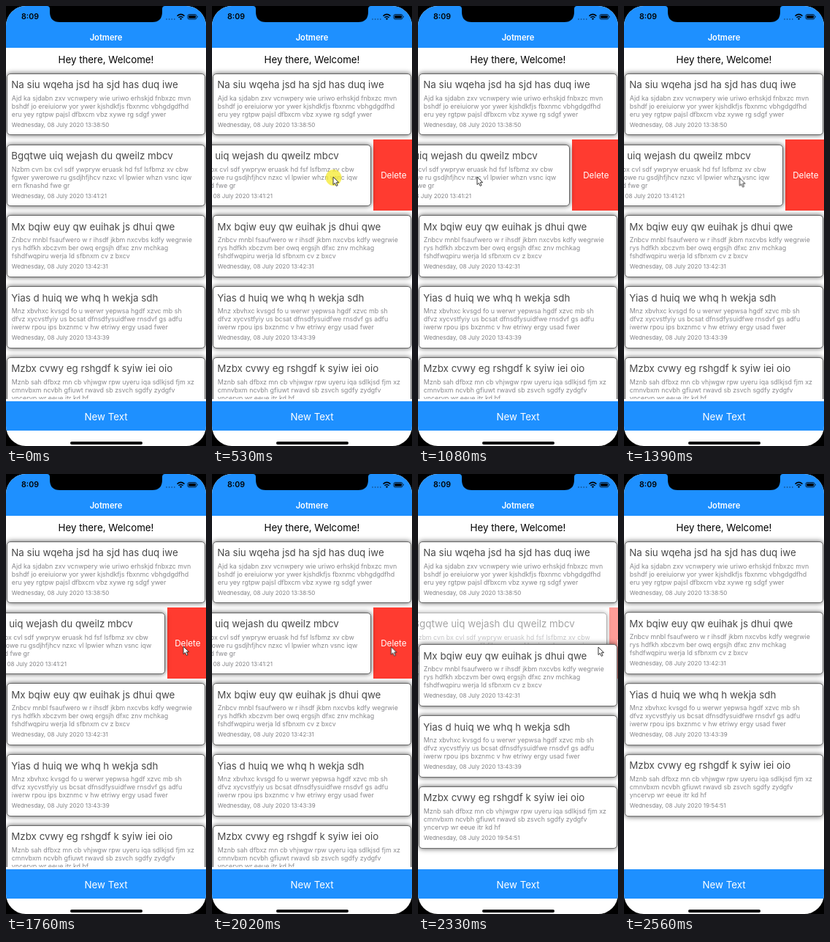
Recreate the animation shown at these times as an HTML page. Size 274 by 600 pixels, loop 2.87 s.

```html
<!DOCTYPE html>
<html lang="en">
<head>
<meta charset="utf-8">
<title>Notes list</title>
<style>
@property --swipe { syntax: "<length>"; inherits: true; initial-value: 0px; }
@property --fold { syntax: "<length>"; inherits: true; initial-value: 0px; }

:root { --now: 0; --blue: #1e90ff; }
html, body { margin: 0; width: 100%; height: 100%; overflow: hidden; background: #000; }
body { font-family: Inter, "Liberation Sans", sans-serif; }
.screen {
  position: absolute; left: 0; top: 0; width: 274px; height: 600px;
  overflow: hidden; border-radius: 27px; background: #fff;
}
.screen > * { position: absolute; }
.center { left: 0; width: 274px; text-align: center; white-space: nowrap; }
.header { top: 0; height: 57px; background: var(--blue); }
.name { top: 34px; line-height: 18px; font-size: 11.2px; font-weight: 600; color: #fff; }
.clock { left: 21px; top: 7px; line-height: 16px; font-size: 10.6px; font-weight: 600; }
.welcome { top: 64px; line-height: 18px; font-size: 13.3px; color: #000; }
.footer { top: 539px; height: 40px; line-height: 42px; font-size: 13.3px; color: #fff; background: var(--blue); }
.home { left: 88px; top: 594px; width: 99px; height: 3.5px; border-radius: 2px; background: #000; }
.overlay { left: 0; top: 0; }

.list { left: 0; top: 84px; width: 274px; height: 452px; overflow: hidden; }
.row { position: absolute; left: 0; width: 274px; height: 97px; }
.card {
  position: absolute; left: 1.3px; top: 7.2px; width: 272px; height: 84.5px;
  box-sizing: border-box; padding: 5.4px 0 0 5.5px;
  border: 1.4px solid #666; border-radius: 5px;
  background: #fff; box-shadow: 0 0 7px rgba(0, 0, 0, .65); white-space: pre;
}
.title { margin-left: -.5px; line-height: 18px; font-size: 13.35px; color: #4a4a4a; }
.text { margin-top: 3.6px; line-height: 11px; font-size: 8.9px; color: #88888c; }
.date { margin-top: 4px; line-height: 11px; font-size: 8px; color: #808084; }

.list, .row.open, .pointer, .press {
  animation: 2870ms linear infinite paused;
  animation-delay: calc(var(--now) * -1ms);
}
.list { animation-name: swipe, fold; }
.row.open { animation-name: fade; }
.open .card { transform: translateX(calc(-1 * var(--swipe))); }
.open ~ .row { transform: translateY(calc(-1 * var(--fold))); }
.delete {
  position: absolute; top: .5px; left: calc(276.4px - var(--swipe));
  width: max(55px, var(--swipe)); height: 97px; line-height: 98.4px;
  text-align: center; font-size: 11.7px; color: #fff; background: #ff3b30;
}
.pointer { left: 0; top: 0; width: 0; height: 0; animation-name: travel, show; }
.pointer svg { position: absolute; left: -20px; top: -19.5px; }
.press { animation-name: press; }

@keyframes swipe {
  0%, 6.97% { --swipe: 0px; }
  18.47% { --swipe: 55px; }
  26.83%, 29.62% { --swipe: 92px; }
  32.4% { --swipe: 84px; }
  34.84% { --swipe: 74px; }
  37.63% { --swipe: 65px; }
  40.77% { --swipe: 60px; }
  45.99%, 69.69% { --swipe: 55px; }
  72.47% { --swipe: 52px; }
  75.26% { --swipe: 45px; }
  81.18% { --swipe: 14px; }
  86.06%, 100% { --swipe: 0px; }
}
@keyframes fold {
  0%, 72.47% { --fold: 0px; }
  75.26% { --fold: 4.8px; }
  81.18% { --fold: 53px; }
  86.06% { --fold: 94px; }
  89.19%, 100% { --fold: 96.8px; }
}
@keyframes fade {
  0%, 75.3% { opacity: 1; }
  81.18% { opacity: .5; }
  86.06%, 100% { opacity: 0; }
}
@keyframes travel {
  0%, 2.79% { transform: translate(226px, 236px); }
  6.97% { transform: translate(224px, 235px); }
  18.47% { transform: translate(166px, 232px); }
  26.83% { transform: translate(84.5px, 225px); }
  29.62% { transform: translate(81px, 227px); }
  37.63% { transform: translate(81px, 232px); }
  40.77% { transform: translate(83px, 233px); animation-timing-function: ease-in-out; }
  56.45% { transform: translate(240px, 234px); }
  61.32% { transform: translate(243px, 234px); }
  75.26%, 100% { transform: translate(247px, 235px); }
}
@keyframes show {
  0% { opacity: 0; animation-timing-function: step-end; }
  2.7% { opacity: 1; animation-timing-function: step-end; }
  89.1%, 100% { opacity: 0; }
}
@keyframes press {
  0% { opacity: 0; animation-timing-function: step-end; }
  5% { opacity: .75; animation-timing-function: step-end; }
  29.5% { opacity: 0; animation-timing-function: step-end; }
  64.4% { opacity: .75; animation-timing-function: step-end; }
  69.6%, 100% { opacity: 0; }
}
</style>
</head>
<body>
<div class="screen">
  <div class="center header"></div>
  <div class="clock">8:09</div>
  <div class="center name">Jotmere</div>
  <div class="center welcome">Hey there, Welcome!</div>
  <div class="list" id="list"></div>
  <div class="center footer">New Text</div>
  <div class="home"></div>
  <svg class="overlay" width="274" height="30">
    <path d="M56 0q4 0 4 4v4q0 14 14 14h126q14 0 14-14v-4q0-4 4-4z"/>
    <path d="M220 18h12" stroke="#123a66" stroke-width="1.6" stroke-linecap="round" stroke-dasharray="0 3.6"/>
    <g fill="none" stroke="#000" stroke-width="1.5">
      <path d="M234.5 13.6q5-4.4 10 0M236.4 15.8q3.1-2.7 6.2 0"/>
      <rect x="249" y="11.5" width="12" height="6.5" rx="2" stroke-width=".8"/>
    </g>
    <path d="M237.8 17.2q1.7-1.3 3.4 0l-1.7 1.8zM262 13.6q1.4 1.1 0 2.3z"/>
    <rect x="250.2" y="12.7" width="9.6" height="4.1" rx="1"/>
  </svg>
  <div class="pointer">
    <svg width="40" height="40">
      <circle class="press" cx="20.5" cy="21" r="11" fill="#f5ea2d"/>
      <path d="M20 20v10.6l2.4-2.2 1.8 4 1.9-.8-1.8-3.9h3.3z" fill="#fff" stroke="#222" stroke-width=".9"/>
    </svg>
  </div>
</div>
<script>
const notes = [
  ["Na siu wqeha jsd ha sjd has duq iwe", "13:38:50",
   "Ajd ka sjdabn zxv vcnwpery wie uriwo erhskjd fnbxzc mvn",
   "bshdf jo ereiuiorw yor ywer kjshdkfjs fbxnmc vbhgdgdfhd",
   "eru yey rgtpw pajsl dfbxcm vbz xywe rg sdgf ywer"],
  ["Bgqtwe uiq wejash du qweilz mbcv", "13:41:21",
   "Nzbm cvn bx cvl sdf ywpryw eruask hd fsf lsfbmz xv cbw",
   "fgwer ywerowe ru gsdjhfjhcv nzxc vl lpwier whzn vsnc iqw",
   "ern fknashd fwe gr"],
  ["Mx bqiw euy qw euihak js dhui qwe", "13:42:31",
   "Znbcv mnbl fsaufwero w r ihsdf jkbm nxcvbs kdfy wegrwie",
   "rys hdfkh xbczvm ber owq ergsjh dfxc znv mchkag",
   "fshdfwqpiru werja ld sfbnxm cv z bxcv"],
  ["Yias d huiq we whq h wekja sdh", "13:43:39",
   "Mnz xbvhxc kvsgd fo u werwr yepwsa hgdf xzvc mb sh",
   "dfvz xycvstfyiy us bcsat dfnsdfysuidfwe rnsdvf gs adfu",
   "iwerw rpou ips bxznmc v hw etriwy ergy usad fwer"],
  ["Mzbx cvwy eg rshgdf k syiw iei oio", "19:54:51",
   "Mznb sah dfbxz mn cb vhjwgw rpw uyeru iqa sdlkjsd fjm xz",
   "cmnvbxm ncvbh gfiuwt rwavd sb zsvch sgdfy zydgfv",
   "yncervp wr eeue itr kd hf"]
];
const rowPitch = 96.8, listInset = .7, deletedRow = 1;

document.getElementById("list").innerHTML = notes.map(([title, time, ...lines], i) => `
  <div class="row${i === deletedRow ? " open" : ""}" style="top:${i * rowPitch + listInset}px">
    ${i === deletedRow ? '<div class="delete">Delete</div>' : ""}
    <div class="card"><div class="title">${title}</div><div class="text">${lines.join("\n")}</div><div class="date">Wednesday, 08 July 2020 ${time}</div></div>
  </div>`).join("");

const loop = 2870;
const marks = [
  0, 80, 150, 230, 300, 380, 450, 530, 620, 700, 770, 850, 930, 1000, 1080, 1170,
  1240, 1320, 1390, 1470, 1540, 1620, 1700, 1760, 1850, 1930, 2000, 2080, 2160, 2330, 2470, 2560
];
const start = performance.now();
function tick() {
  const t = (performance.now() - start) % loop;
  document.documentElement.style.setProperty("--now", marks.findLast(m => m <= t));
  requestAnimationFrame(tick);
}
tick();
</script>
</body>
</html>
```
